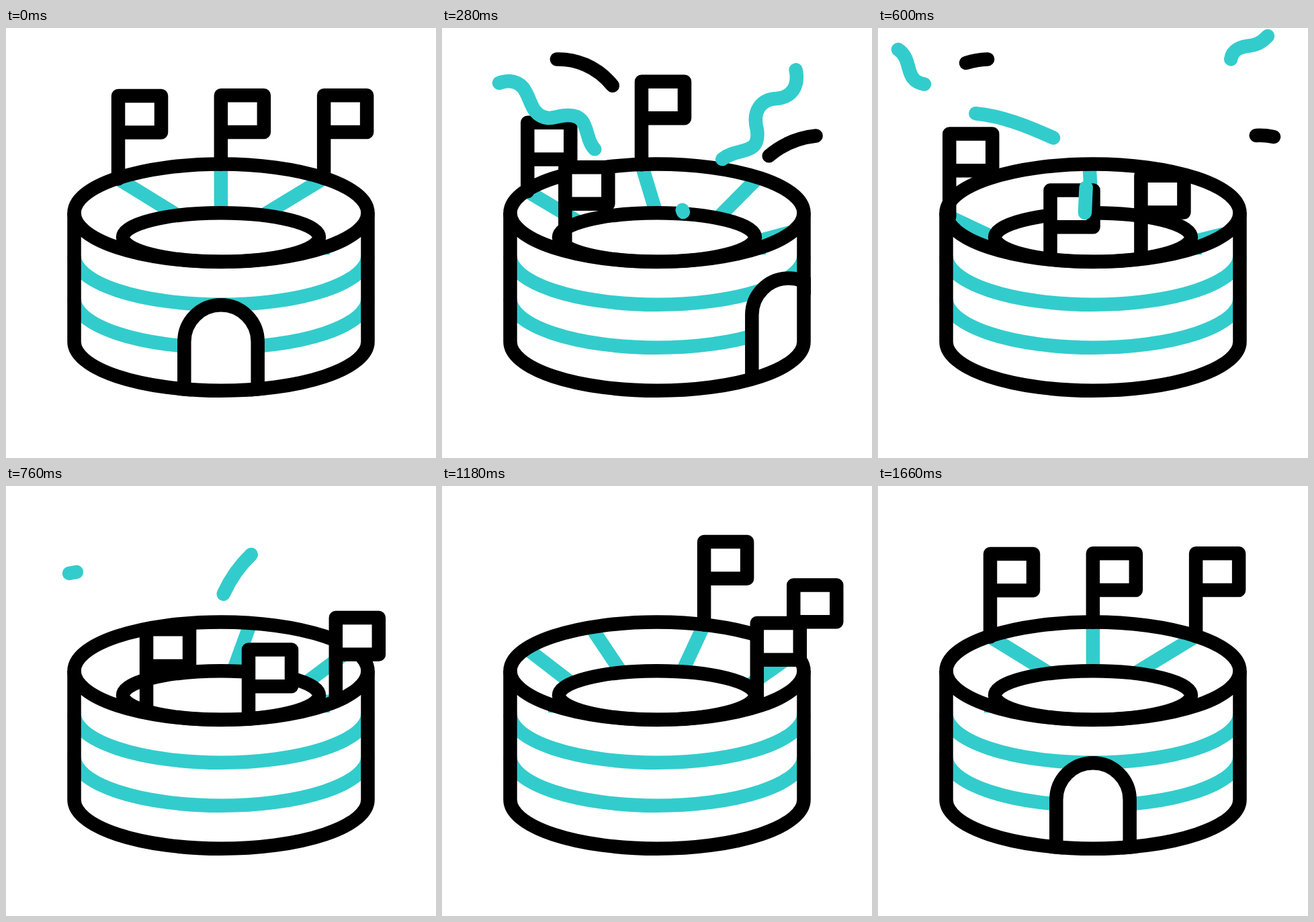
These frames come from a looping animation (640x640 px, 2400 ms). An HTML page:

```html
<!DOCTYPE html>
<html lang="en">
<head>
<meta charset="utf-8">
<title>Stadium</title>
<style>
  html, body { margin: 0; width: 100%; height: 100%; overflow: hidden; background: #fff; }
  svg { display: block; width: 100vw; height: 100vh; }
  path, ellipse { fill: none; stroke: #000; stroke-width: 20.5; stroke-linejoin: round; }
  .teal path, path.teal { stroke: #33cccc; }
  .white { fill: #fff; }
  .round path { stroke-linecap: round; }
</style>
</head>
<body>
<svg viewBox="0 0 640 640">
  <clipPath id="wall"><path d="M91 275V467A229 83 0 0 0 549 467V275Z"/></clipPath>
  <g class="teal">
    <path d="M101.5 339A218.5 72.75 0 0 0 538.5 339M101.5 403A218.5 72.75 0 0 0 538.5 403"/>
    <path id="parkRight" d="M472 327h10"/>
    <path id="parkLeft" d="M168 327h-10"/>
  </g>
  <g clip-path="url(#wall)">
    <path id="door" class="white" d="M265.3 590V467A54.7 54.7 0 0 1 374.7 467V590"/>
  </g>
  <g id="spokes" class="teal"></g>
  <ellipse class="white" cx="320" cy="311.5" rx="146" ry="36.25"/>
  <ellipse cx="320" cy="275.2" rx="218.5" ry="72.75"/>
  <path d="M101.5 275V467A218.5 72.75 0 0 0 538.5 467V275"/>
  <g id="flags" class="round"></g>
  <g id="ribbons" class="round"></g>
</svg>
<script>
const LOOP = 2400, TURN = 1660, STEP = 20;
const rim = { x: 321, y: 275, rx: 215.5, ry: 72.3 };
const pit = { x: 320, y: 311.5, rx: 146, ry: 36.25 };
const $ = id => document.getElementById(id);

function addPath(parent, d, cls) {
  const p = document.createElementNS('http://www.w3.org/2000/svg', 'path');
  if (d) p.setAttribute('d', d);
  if (cls) p.setAttribute('class', cls);
  parent.appendChild(p);
  return p;
}

// Linear interpolation through [time, value] pairs.
function track(keys, t) {
  if (t <= keys[0][0]) return keys[0][1];
  for (let i = 1; i < keys.length; i++) {
    const [t0, a] = keys[i - 1], [t1, b] = keys[i];
    if (t <= t1) return a + (b - a) * (t - t0) / (t1 - t0);
  }
  return keys[keys.length - 1][1];
}

// Arc length of the rim per degree, from its top; positive runs left.
const arc = [0];
for (let i = 0; i < 360; i++) {
  const a = (i + 0.5) * Math.PI / 180;
  arc.push(arc[i] + Math.hypot(rim.rx * Math.cos(a), rim.ry * Math.sin(a)) * Math.PI / 180);
}
const LAP = arc[360];

function arcAt(deg) {
  const laps = Math.floor(deg / 360), d = deg - laps * 360, i = Math.floor(d);
  return laps * LAP + arc[i] + (arc[i + 1] - arc[i]) * (d - i);
}

function rimPoint(s) {
  s = ((s % LAP) + LAP) % LAP;
  let i = 0;
  while (i < 359 && arc[i + 1] < s) i++;
  const a = (i + (s - arc[i]) / (arc[i + 1] - arc[i])) * Math.PI / 180;
  const u = -Math.sin(a), c = Math.cos(a);
  return { u, back: c > 0, x: rim.x + rim.rx * u, y: rim.y - rim.ry * c };
}

// Flags make one full turn; keys are degrees turned into distance.
const marks = [0, 280, 460, 760, 1180, 1480, TURN];
const turning = degrees => degrees.map((d, i) => [marks[i], arcAt(d)]);
const flags = [
  { pole: 123.5, keys: turning([45.6, 140.3, 174.9, 232, 341.3, 379.5, 405.6]) },
  { pole: 102.5, keys: turning([0.3, 64, 134.4, 190.7, 290.2, 338.8, 360.3]) },
  { pole: 123.5, keys: turning([-44.9, 6.4, 40, 148.7, 223.3, 287.4, 315.1]) }
];
const bend = [[0, 2.43], [280, 2.2], [460, 1.3], [1480, 1.15], [TURN, 2.43]];
for (const f of flags) {
  const top = -f.pole;
  f.bend = bend;
  f.el = addPath($('flags'), `M0 0V${top}H64V${top + 54.7}H0`, 'white');
}

// Spokes that only cross the back, from right front to left front.
const crossing = [
  [[0, -331], [280, -151], [460, -71], [760, 95], [1100, 331]],
  [[0, -331], [280, -276], [460, -214], [760, -43], [1180, 200], [1480, 292], [1580, 331]],
  [[500, -331], [760, -199], [1180, 99], [1480, 210], [TURN, 331]]
].map(keys => ({ keys, bend: [[0, 1.3]] }));

const spokes = [...flags, ...crossing].map(owner => ({ owner, el: addPath($('spokes')) }));

const burst = {
  head: [[20, 0], [280, 0.78], [400, 1]],
  tail: [[130, 0], [280, 0.263], [460, 0.572], [700, 1]]
};
const ribbons = [
  { ...burst, cls: 'teal', d: 'M262 275C258 235 242 200 228 181C210 165 222 128 186 130C176 130 168 134 158 134C122 130 138 82 100 79C90 79 82 84 72 84C36 80 54 48 30 32' },
  { ...burst, cls: 'teal', d: 'M371 284C380 244 395 212 415 197C438 176 474 192 469 152C461 122 476 106 498 105C520 103 531 88 527 64C519 34 536 28 556 26C568 24 574 18 580 12' },
  { ...burst, d: 'M277 128C271 111 264 98 254 86C230 56 198 46 171 46.5C157 46 144 48 131 52' },
  { ...burst, d: 'M464 222C470 210 477 199 487 190C507 173 532 163 557 160.5C568 159 579 160 589 162' },
  { cls: 'teal', d: 'M359 274C335 212 300 180 260 163C205 138 150 118 94 130',
    head: [[276, 0], [460, 0.47], [660, 1]],
    tail: [[440, 0], [460, 0.03], [760, 0.966], [780, 1]] },
  { cls: 'teal', d: 'M308 275C310 220 312 185 324 160C334 138 348 118 366 101C390 80 420 70 452 72',
    head: [[560, 0], [760, 0.665], [900, 1]],
    tail: [[640, 0], [760, 0.41], [960, 1]] }
];
for (const r of ribbons) {
  r.el = addPath($('ribbons'), r.d, r.cls);
  r.len = r.el.getTotalLength();
}

// The door leaves at the right and comes back from the left along a parabola.
function drawDoor(t) {
  const x = 0.7 * (t < TURN / 2 ? t : t - TURN);
  $('door').setAttribute('transform', `translate(${x} ${-x * x / 965})`);
}

function drawSpoke({ owner, el }, t) {
  const p = rimPoint(track(owner.keys, t));
  const power = p.back ? track(owner.bend, t) : 0.25;
  const v = Math.sign(p.u) * Math.abs(p.u) ** power;
  const drop = pit.ry * Math.sqrt(1 - v * v) * (p.back ? -1 : 1);
  el.setAttribute('d', `M${p.x} ${p.y}L${pit.x + pit.rx * v} ${pit.y + drop}`);
}

function drawFlags(t) {
  for (const f of flags) {
    const p = rimPoint(track(f.keys, t));
    f.y = p.y;
    f.el.setAttribute('transform', `translate(${p.x} ${p.y})`);
  }
  // Nearer flags cover farther ones.
  [...flags].sort((a, b) => a.y - b.y).forEach(f => $('flags').appendChild(f.el));
}

function drawRibbon(r, t) {
  const head = track(r.head, t) * r.len, tail = track(r.tail, t) * r.len;
  r.el.style.display = head - tail > 0.5 ? '' : 'none';
  r.el.style.strokeDasharray = `${head - tail} ${r.len * 2}`;
  r.el.style.strokeDashoffset = -tail;
}

function draw(t) {
  drawDoor(t);
  spokes.forEach(s => drawSpoke(s, t));
  drawFlags(t);
  ribbons.forEach(r => drawRibbon(r, t));
  $('parkRight').style.display = t < 800 ? '' : 'none';
  $('parkLeft').style.display = t > 1080 ? '' : 'none';
}

const begin = performance.now();
function tick() {
  const t = (performance.now() - begin) % LOOP;
  draw(Math.min(TURN, Math.floor(t / STEP) * STEP));
  requestAnimationFrame(tick);
}
tick();
</script>
</body>
</html>
```
